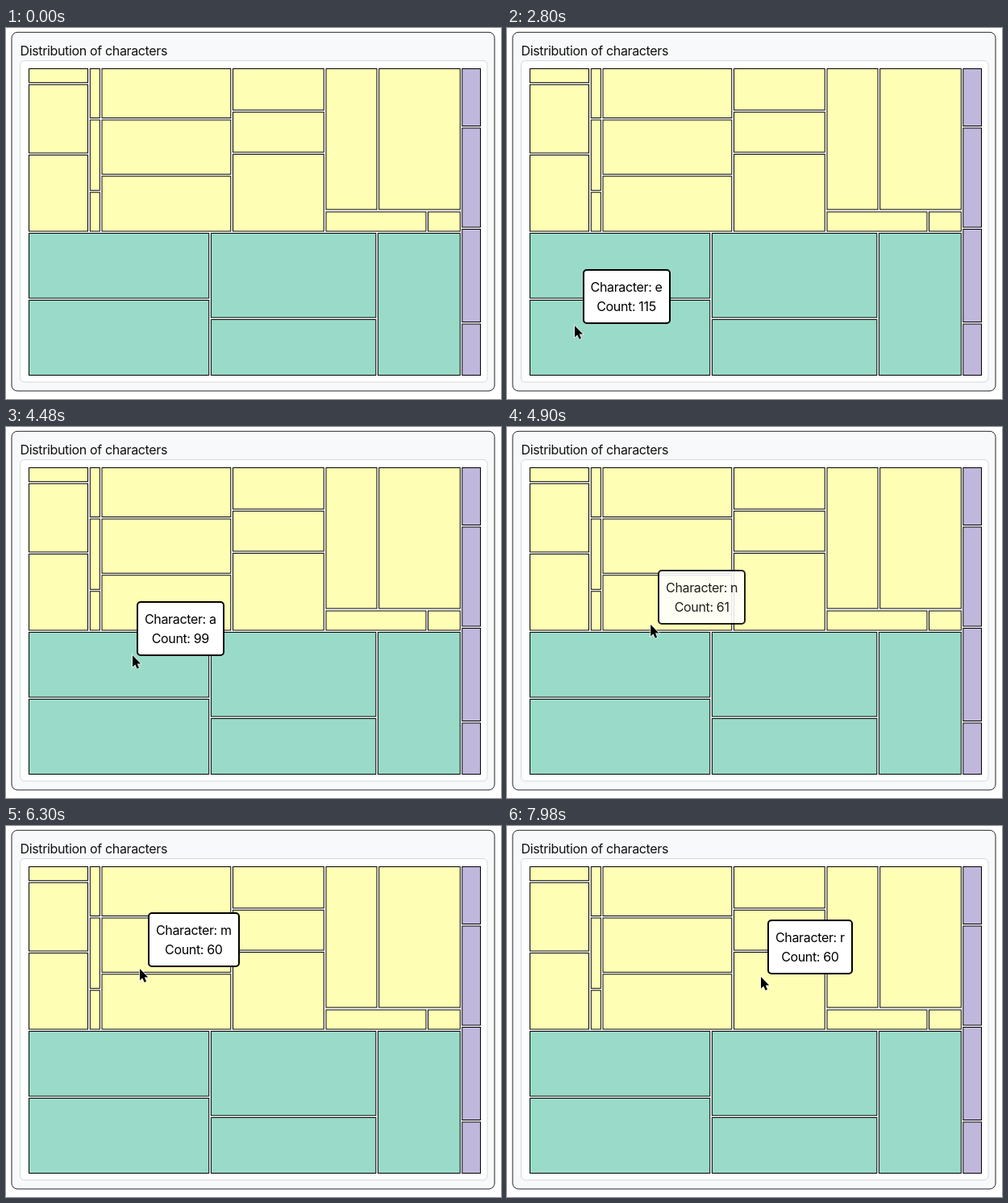
An HTML page that plays this animation: 614x460 px, repeating every 8000 ms.

```html
<!DOCTYPE html>
<html lang="en">
<head>
<meta charset="utf-8">
<title>Distribution of characters</title>
<style>
  html, body { margin: 0; width: 100%; height: 100%; overflow: hidden; background: #fff; }
  body { position: relative; font: 16px/24px Inter, "Liberation Sans", sans-serif; letter-spacing: -.35px; }
  svg { position: absolute; left: 0; top: 0; overflow: hidden; }
  #tip {
    position: absolute; left: 0; top: 0; padding: 8px; border: 2px solid #000; border-radius: 5px;
    background: #fff; text-align: center; white-space: pre; opacity: 0;
  }
</style>
</head>
<body>
<svg width="614" height="460">
  <rect x="7" y="5.3" width="599" height="444.7" rx="7" fill="#f8f9fa" stroke="#212529"/>
  <rect x="17.5" y="40.5" width="579.5" height="398.5" rx="5" fill="#fff" stroke="#d5d8db"/>
  <text x="17.5" y="33.5" fill="#111">Distribution of characters</text>
  <g id="map" stroke="#000"></g>
</svg>
<div id="tip"></div>
<svg width="614" height="460">
  <path id="cursor" d="M0 0V14.5L3.3 11.4L5.6 16.7L8 15.7L5.8 10.5H10.2Z" stroke="#fff" stroke-width="1.4" paint-order="stroke"/>
</svg>
<script>
const LOOP = 8000, STEP = 70, GAP = 2.5, LAG = 30, FADE = 200;
const yellow = '#fffeb5', green = '#99dbc8', purple = '#c0b7dc';

// Columns of the treemap: colour, left, right, tops of the cells, bottom
const columns = [
  [yellow, 28.5, 101.5, [50.5, 70.2, 157.5], 252],
  [yellow, 104.3, 116.3, [50.5, 114, 203.8], 252],
  [yellow, 119, 278.8, [50.5, 114, 183.8], 252],
  [yellow, 281.5, 394.2, [50.5, 104.3, 156.5], 252],
  [yellow, 397, 460, [50.5], 225],
  [yellow, 462.7, 563.3, [50.5], 225],
  [yellow, 397, 521, [228], 252],
  [yellow, 523.5, 563.3, [228], 252],
  [green, 28.5, 251.7, [254.5, 337.5], 430.5],
  [green, 254.4, 458.8, [254.5, 361.5], 430.5],
  [green, 461.4, 563.3, [254.5], 430.5],
  [purple, 565.8, 588.5, [50.5, 124, 249.5, 367], 430.5],
];

// Pointer path: time, x, y
const path = [
  [1820, -14, 400], [1890, 2, 394], [2240, 82, 370], [2310, 83, 370],
  [2730, 83, 370], [2800, 84, 369], [2940, 84, 369],
  [3400, 115, 333], [3430, 117, 331], [3780, 118, 311.5], [3850, 118, 311],
  [4270, 118, 311], [4450, 152, 286], [4480, 157, 283], [5110, 184, 235.5], [5180, 185, 235],
  [5810, 185, 235], [6160, 169, 181], [6270, 166, 177], [6300, 166, 177], [6580, 161, 167],
  [7070, 161, 167], [7950, 313, 186], [7980, 315, 187],
];

// Hovered cells: time of entry, character, count, opacity at entry
const hovers = [
  [1960, 'e', 115, 0], [3380, 'a', 99, .75], [4800, 'n', 61, .75],
  [6100, 'm', 60, .75], [7660, 'r', 60, .75],
];

const [map, tip, cursor] = ['map', 'tip', 'cursor'].map(id => document.getElementById(id));

map.innerHTML = columns.map(([fill, x0, x1, tops, bottom]) => tops.map((y, i) => {
  const end = i + 1 < tops.length ? tops[i + 1] - GAP : bottom;
  return `<rect x="${x0}" y="${y}" width="${x1 - x0}" height="${end - y}" fill="${fill}"/>`;
}).join('')).join('');

const slope = (i, k) => path[i] && path[i + 1]
  ? (path[i + 1][k] - path[i][k]) / (path[i + 1][0] - path[i][0]) : 0;

// Harmonic mean keeps the curve free of overshoot
function tangent(i, k) {
  const a = slope(i - 1, k), b = slope(i, k);
  return a * b > 0 ? 2 * a * b / (a + b) : 0;
}

function pointer(t) {
  const last = path.length - 1;
  t = Math.min(Math.max(t, path[0][0]), path[last][0]);
  const i = Math.min(path.findLastIndex(p => p[0] <= t), last - 1);
  const span = path[i + 1][0] - path[i][0], u = (t - path[i][0]) / span, v = 1 - u;
  return [1, 2].map(k =>
    v * v * (1 + 2 * u) * path[i][k] + u * u * (3 - 2 * u) * path[i + 1][k] +
    span * u * v * (v * tangent(i, k) - u * tangent(i + 1, k)));
}

function draw(t) {
  const [x, y] = pointer(t), [mx, my] = pointer(t - LAG);
  cursor.setAttribute('transform', `translate(${x} ${y})`);
  const hover = hovers.findLast(h => h[0] <= t);
  tip.style.opacity = hover ? hover[3] + (1 - hover[3]) * Math.min(1, (t - hover[0]) / FADE) : 0;
  if (!hover) return;
  tip.textContent = `Character: ${hover[1]}\nCount: ${hover[2]}`;
  tip.style.left = mx + 10 + 'px';
  tip.style.top = my - 70 + 'px';
}

const start = performance.now();
function frame() {
  const t = (performance.now() - start) % LOOP;
  draw(Math.floor(t / STEP) * STEP);
  requestAnimationFrame(frame);
}
draw(0);
requestAnimationFrame(frame);
</script>
</body>
</html>
```
